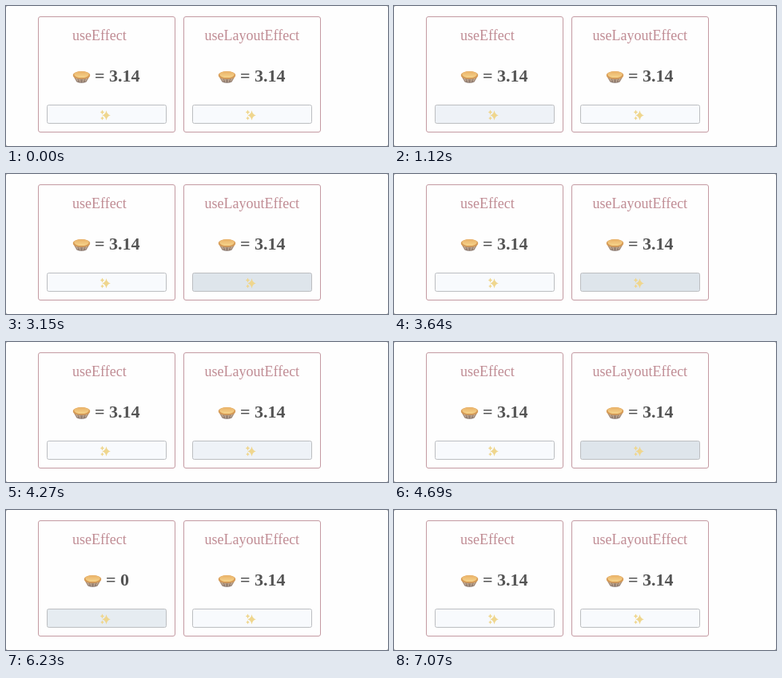
Recreate the animation shown at these times as an HTML page. Size 478 px wide and 176 px high, loop 7.42 s.

```html
<!DOCTYPE html>
<html lang="en">
<head>
<meta charset="utf-8">
<title>useEffect and useLayoutEffect</title>
<style>
html, body { margin: 0; width: 100%; height: 100%; overflow: hidden; background: #999; }
svg { display: block; }
text { font-family: "Liberation Serif", Times, serif; }
.title { font-size: 18px; fill: #c08c94; }
.value { font-size: 22px; font-weight: bold; fill: #545454; }
.card { fill: none; stroke: #c49aa2; }
.button { stroke: #bcbec1; }
</style>
</head>
<body>
<svg width="478" height="176" viewBox="0 0 478 176">
  <defs>
    <linearGradient id="crust" x2="0" y2="1">
      <stop offset="0" stop-color="#e9b066"/>
      <stop offset="1" stop-color="#f6d58c"/>
    </linearGradient>
    <linearGradient id="dish" x2="0" y2="1">
      <stop offset="0" stop-color="#d8a263"/>
      <stop offset=".5" stop-color="#a58c78"/>
      <stop offset="1" stop-color="#806f68"/>
    </linearGradient>
    <g id="pie">
      <path d="M84 88 L88.5 95.5 Q94.500 98 100.500 95.500 L105 88Z" fill="url(#dish)"/>
      <path d="M88 91l2 4M92 92l1 4M97 92l-1 4M101 91l-2 4" stroke="#d3bda5" stroke-width=".8"/>
      <ellipse cx="94.500" cy="87" rx="10.800" ry="4.800" fill="#d79b55"/>
      <ellipse cx="94.500" cy="86" rx="9.300" ry="4.100" fill="url(#crust)"/>
    </g>
    <path id="star" d="M0-1Q.18-.18 1 0Q.18 .18 0 1Q-.18 .18-1 0Q-.18-.18 0-1Z"/>
    <g id="sparkles" fill="#efd68e">
      <use href="#star" transform="translate(125.500 137.500) scale(5.300 6.200)"/>
      <use href="#star" transform="translate(120.500 133.500) scale(2.700 3)"/>
      <use href="#star" transform="translate(120.500 141) scale(2.300 2.600)"/>
    </g>
  </defs>
  <rect width="478" height="176" rx="2" fill="#fefefe"/>
</svg>
<script>
const LOOP = 7420, STEP = 70;
const IDLE = [248, 250, 253], HOVER = [238, 242, 247], PRESS = [222, 229, 235];

// Each press swaps colour at once; every other change fades over two steps.
const leftMoves = [
  [980, HOVER], [1260, PRESS], [1540, HOVER], [1960, IDLE],
  [5250, HOVER], [5950, PRESS], [6230, HOVER], [6650, IDLE]
];
const rightMoves = [
  [2940, HOVER], [3150, PRESS], [3290, HOVER], [3500, PRESS], [3780, HOVER],
  [3990, PRESS], [4200, HOVER], [4340, PRESS], [4550, HOVER],
  [4690, PRESS], [4830, HOVER], [5250, IDLE]
];
const resets = [1540, 6230];

function addCard(x, title, titleX) {
  const g = document.createElementNS("http://www.w3.org/2000/svg", "g");
  g.setAttribute("transform", `translate(${x})`);
  g.innerHTML = `
    <rect class="card" x="40.500" y="13.500" width="171" height="145" rx="2.500"/>
    <text class="title" x="${titleX}" y="43">${title}</text>
    <g class="row"><use href="#pie"/><text class="value" x="111" y="95">= 3.14</text></g>
    <rect class="button" x="51.500" y="124.500" width="149" height="23" rx="2"/>
    <use href="#sparkles"/>`;
  document.querySelector("svg").append(g);
  return g;
}

function colorAt(moves, t) {
  let from = IDLE, color = IDLE;
  for (const [start, to] of moves) {
    if (t < start) break;
    const p = to === PRESS ? 1 : Math.min(1, (t - start + STEP) / (2 * STEP));
    color = from.map((c, i) => c + (to[i] - c) * p);
    from = to;
  }
  return `rgb(${color.map(Math.round)})`;
}

const left = addCard(0, "useEffect", 83);
const right = addCard(182, "useLayoutEffect", 66.5);
const row = left.querySelector(".row"), value = left.querySelector(".value");

function draw() {
  const t = Math.floor(performance.now() % LOOP / STEP) * STEP;
  left.querySelector(".button").style.fill = colorAt(leftMoves, t);
  right.querySelector(".button").style.fill = colorAt(rightMoves, t);
  const reset = resets.includes(t);
  value.textContent = reset ? "= 0" : "= 3.14";
  row.setAttribute("transform", `translate(${reset ? 14 : 0})`);
  requestAnimationFrame(draw);
}
draw();
</script>
</body>
</html>
```
